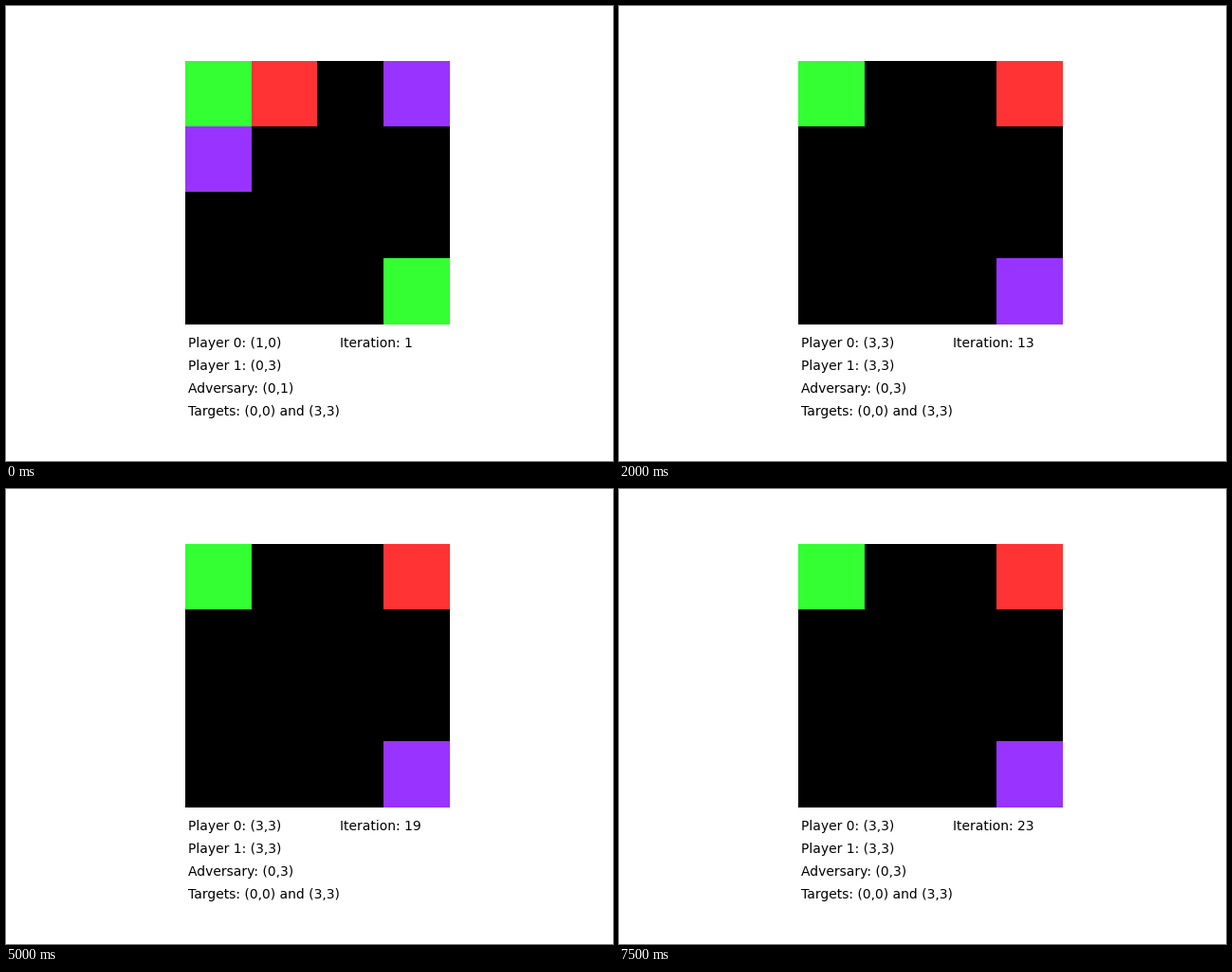
Recreate the animation shown at these times as a matplotlib script. Size 640 by 480 pixels, loop 8 s.

```python
import numpy as np
import matplotlib.pyplot as plt
from matplotlib.animation import FuncAnimation

SIZE = 4
GREEN, RED, PURPLE = (51, 255, 51), (255, 51, 51), (153, 51, 255)
TARGETS = [(0, 0), (3, 3)]
FAR, NEAR = (3, 3), (2, 3)

# Iterations play in text order: 1, 10, 11, ..., 19, 2, 20, ...
ORDER = sorted([1, 2, *range(10, 24)], key=str)

# Iteration numbers at which each player stands one cell off its target
OFF_0 = {11, *range(14, 19)}
OFF_1 = {11, 12, 20, 22}
# Player 0, player 1 and adversary at the start
OPENING = {1: ((1, 0), (0, 3), (0, 1)), 2: ((2, 0), (0, 3), (0, 2))}


def state(it):
    if it in OPENING:
        return OPENING[it]
    return (NEAR if it in OFF_0 else FAR,
            NEAR if it in OFF_1 else FAR,
            (0, 3))


def board(p0, p1, adversary):
    cells = np.zeros((SIZE, SIZE, 3), dtype=np.uint8)
    for target in TARGETS:
        cells[target] = GREEN
    cells[p0] = cells[p1] = PURPLE
    cells[adversary] = RED
    return cells


def fmt(pos):
    return "({},{})".format(*pos)


fig, ax = plt.subplots(figsize=(6.4, 4.8), dpi=100, facecolor="white")
fig.subplots_adjust(left=0.125, right=0.9, bottom=0.3, top=0.88)
ax.axis("off")
image = ax.imshow(board(*state(1)), interpolation="nearest")


def label(x, y, text=""):
    return fig.text(x, y, text, fontsize=10, family="DejaVu Sans", color="black")


rows = [label(0.3, y) for y in (0.25, 0.2, 0.15)]
label(0.3, 0.1, "Targets: " + " and ".join(map(fmt, TARGETS)))
counter = label(0.55, 0.25)


def update(i):
    it = ORDER[i]
    positions = state(it)
    image.set_data(board(*positions))
    for row, name, pos in zip(rows, ("Player 0", "Player 1", "Adversary"), positions):
        row.set_text(f"{name}: {fmt(pos)}")
    counter.set_text(f"Iteration: {it}")
    return [image, counter, *rows]


anim = FuncAnimation(fig, update, frames=len(ORDER), interval=500,
                     repeat=True, repeat_delay=0, blit=False)
plt.show()
```
